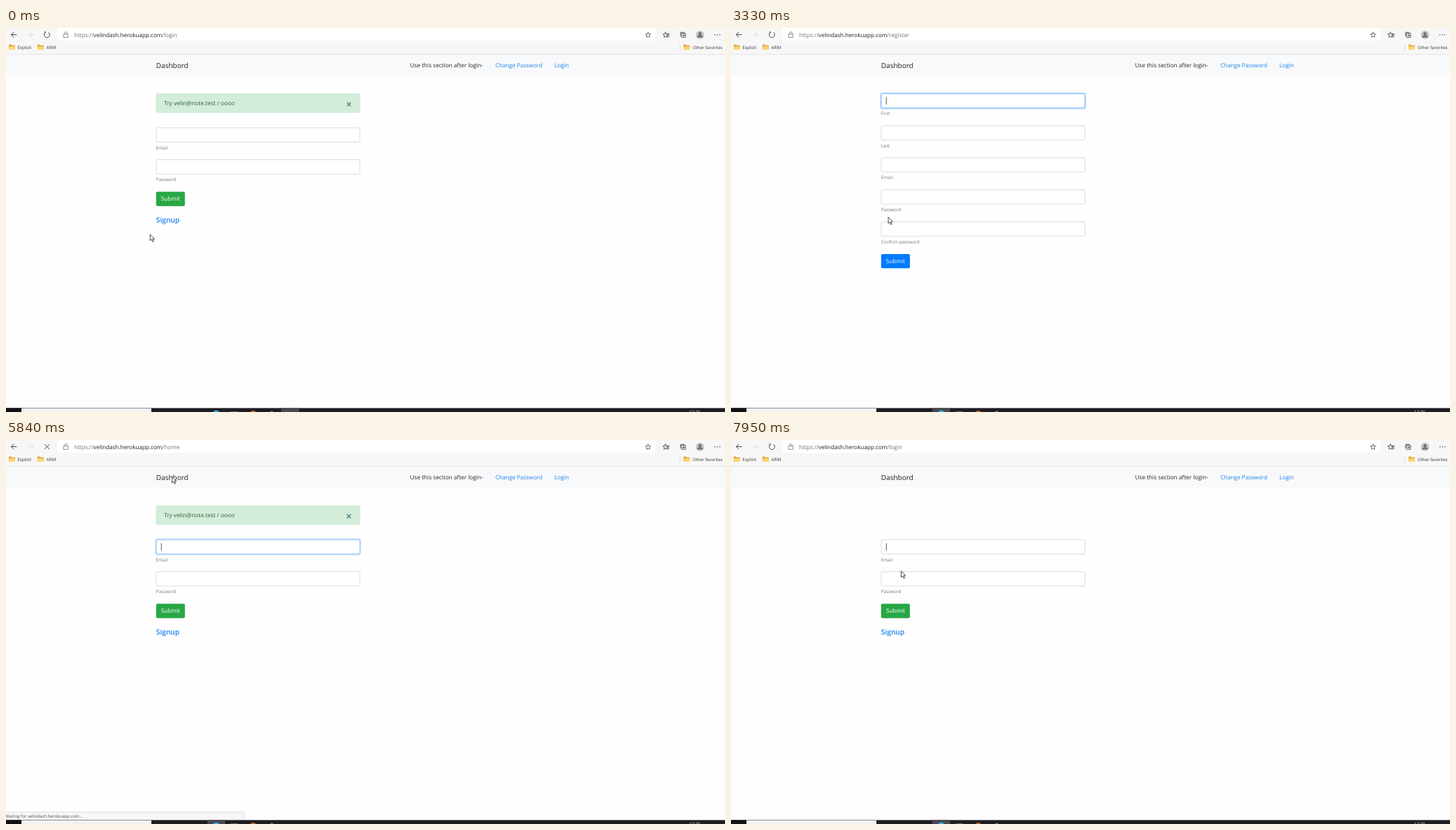
These frames come from a looping animation (1024 px wide and 547 px high, 8000 ms). An HTML page:

```html
<!DOCTYPE html>
<html lang="en">
<head>
<meta charset="utf-8">
<title>Dashbord</title>
<style>
  html, body { margin: 0; width: 100%; height: 100%; overflow: hidden; background: #fefefe; }
  svg { display: block; width: 100vw; height: 100vh; }
  text { font-family: "Open Sans", "Noto Sans", sans-serif; text-rendering: geometricPrecision; }
  .line { fill: none; stroke: #4a4a4a; stroke-width: 1; stroke-linecap: round; stroke-linejoin: round; }
  .cur { fill: #fff; stroke: #222; stroke-width: .8; stroke-linejoin: round; }
</style>
</head>
<body>
<svg id="stage" viewBox="0 0 1024 547" preserveAspectRatio="none"></svg>
<script>
const LOOP = 8000;
const HOST = 'velindash.herokuapp.com';
const stage = document.getElementById('stage');

// Markup helpers
const text = (x, y, size, fill, str, extra = '') =>
  `<text x="${x}" y="${y}" font-size="${size}" fill="${fill}" ${extra}>${str}</text>`;
const rect = (x, y, w, h, fill, extra = '') =>
  `<rect x="${x}" y="${y}" width="${w}" height="${h}" fill="${fill}" ${extra}/>`;
const line = (d, extra = '') => `<path class="line" d="${d}" ${extra}/>`;
const group = (id, body, extra = '') => `<g id="${id}" ${extra}>${body}</g>`;

const field = (y, label) =>
  rect(214, y, 290, 20.4, '#fff', 'rx="2" stroke="#ced4da" stroke-width=".8"') +
  text(213.8, y + 30.5, 6.4, '#6c757d', label);
const button = (y, fill) =>
  rect(213.8, y, 41, 20.4, fill, 'rx="2"') + text(220.8, y + 13.1, 8.2, '#fff', 'Submit');
const folder = x =>
  `<path d="M${x} 31V23.5h3.2l1.2 1.2h4.6V31z" fill="#e3a93c"/>` +
  `<path d="M${x} 31l.8-4.8h8.2V31z" fill="#fbd672"/>`;

const star = (x, y) => {
  let d = '';
  for (let i = 0; i < 10; i++) {
    const r = i % 2 ? 1.8 : 4, a = i * Math.PI / 5 - Math.PI / 2;
    d += (i ? 'L' : 'M') + (x + r * Math.cos(a)).toFixed(2) + ' ' + (y + r * Math.sin(a)).toFixed(2);
  }
  return d + 'z';
};

const toolbar =
  rect(0, 0, 1024, 37.5, '#f7f7f7') +
  rect(0, 37, 1024, 1, '#e6e6e6') +
  rect(73, -3, 852, 21.2, '#fff', 'id="omnibox" rx="2.5"') +
  line('M7.5 9.5H15M11 6L7.5 9.5 11 13') +
  line('M31 9.5h7.5M35 6l3.5 3.5L35 13', 'style="stroke:#dcdcdc"') +
  group('reload', line('M56.2 6.2A4 4 0 1 0 60.6 6.3M55.2 4.9l1.2 1.5-1.7 1')) +
  group('stop', line('M55.3 6.4l6.4 6.4M61.7 6.4l-6.4 6.4')) +
  line('M82.3 8.6h6v4.8h-6zM83.6 8.5V7.2a1.7 1.7 0 0 1 3.4 0v1.3', 'style="stroke:#777;stroke-width:.8"') +
  `<text x="97" y="13" font-size="8.1" fill="#737373">https://<tspan fill="#1d1d1d">${HOST}</tspan><tspan id="path"></tspan></text>` +
  line(star(914.5, 10), 'style="stroke-width:.8"') +
  line(star(939.3, 10) + 'M941.5 8.3h3M942 10.3h2.5M942.5 12.3h2', 'style="stroke-width:.9"') +
  line('M960.8 11V6.2h5.2M962.3 7.6h5.6v5.6h-5.6zM965.1 9v2.9M963.7 10.4h2.9', 'style="stroke-width:.9"') +
  '<circle cx="988.4" cy="9.7" r="6" fill="#c9c7c5"/>' +
  '<circle cx="988.4" cy="8" r="2.3" fill="#77716d"/><path d="M984.2 13.6a4.2 3.6 0 0 1 8.4 0z" fill="#77716d"/>' +
  [1009.7, 1013.2, 1016.7].map(x => `<circle cx="${x}" cy="9.7" r=".75" fill="#444"/>`).join('') +
  folder(4) + text(16.3, 29.7, 6.3, '#333', 'Exploit') +
  folder(44.8) + text(57.5, 29.7, 6.3, '#333', 'ARM') +
  rect(959.5, 23, .8, 9, '#d4d4d4') +
  folder(965) + text(978, 29.7, 6.05, '#333', 'Other favorites');

const navbar =
  rect(0, 38, 1024, 30, '#f8f9fa') +
  text(213.8, 56.9, 10, '#1f2022', 'Dashbord') +
  text(575.5, 56, 8.22, '#212529', 'Use this section after login-') +
  text(697, 56, 8.08, '#1a82f0', 'Change Password') +
  text(781, 56, 8.2, '#1a82f0', 'Login');

const alertBox =
  rect(214, 93.8, 290, 26.4, '#d4edda', 'rx="2" stroke="#c3e6cb" stroke-width=".8"') +
  text(225, 110.3, 8.25, '#2b6238', 'Try velin@note.test / oooo') +
  line('M485.9 106.2l4.8 4.8M490.7 106.2l-4.8 4.8', 'id="close" style="stroke-width:1.3"');

const login =
  field(142, 'Email') + field(187.6, 'Password') + button(233.3, '#28a745') +
  text(213.8, 277.2, 10.2, '#1a82f0', 'Signup', 'id="signup" font-weight="600"') +
  rect(214, 278.4, 34, .9, '#0056b3', 'id="under"');

const register =
  ['First', 'Last', 'Email', 'Password', 'Confirm password']
    .map((s, i) => field(93.6 + i * 45.65, s)).join('') + button(321.9, '#007bff');

const focus =
  group('ring',
    rect(213.2, -.8, 291.6, 22, 'none', 'rx="2.6" stroke="#bfdeff" stroke-width="2"') +
    rect(214, 0, 290, 20.4, 'none', 'rx="2" stroke="#80bdff" stroke-width=".9"')) +
  rect(220.8, 5, .9, 10.6, '#444', 'id="caret"');

const status =
  rect(-3, 530, 100, 14, '#f7f7f7', 'id="bubble" rx="2" stroke="#d6d6d6" stroke-width=".8"') +
  text(-1.7, 537.8, 6.1, '#4c4c4c', '', 'id="note"');

const taskbar =
  rect(0, 541.4, 1024, 6, '#1d1c20') +
  rect(0, 541.4, 22, 6, '#111114') +
  rect(22, 541.8, 185, 6, '#f2f2f2') +
  rect(0, 541.4, 25.6, 6, '#48484e', 'id="active"') +
  '<circle cx="299.4" cy="550" r="5.4" fill="#38a9e0"/>' +
  rect(320, 546, 10.5, 2, '#66666a') +
  '<circle cx="352" cy="550" r="5" fill="#b8652e"/>' +
  rect(376.5, 545.6, 4, 2, '#77777c') +
  text(973, 548.6, 6, '#f0f0f0', '12:20');

const cursors =
  group('arrow', '<path class="cur" d="M0 0V9l2.1-1.9 1.5 3.4 1.5-.7-1.5-3.2h2.7z"/>') +
  group('hand', '<path class="cur" d="M-1 .8a1 1 0 0 1 2 0V4.4l3.8.9q1.2.4 1.1 1.7L5.2 9.6 4.4 12H-.4L-3 7.8q-.4-1 .5-1.2L-1 7.6z"/>' +
    '<path class="line" d="M1 4.4v2M2.7 4.9v1.7M4.3 5.3v1.5" style="stroke-width:.5"/>') +
  group('beam', line('M-1.8-4.8h1.3l.5.5.5-.5h1.3M0-4.3V4.3M-1.8 4.8h1.3l.5-.5.5.5h1.3', 'style="stroke-width:.9;stroke:#333"'));

stage.innerHTML =
  rect(0, 0, 1024, 547, '#fefefe') + toolbar +
  group('navbar', navbar) + group('alert', alertBox) + group('login', login) +
  group('register', register) + group('focus', focus) +
  group('status', status) + taskbar + cursors;

const el = {};
stage.querySelectorAll('[id]').forEach(n => el[n.id] = n);
const set = (id, name, value) => el[id].setAttribute(name, value);
const show = (id, on) => set(id, 'visibility', on ? 'visible' : 'hidden');
const ramp = (t, a, b) => Math.min(1, Math.max(0, (t - a) / (b - a)));
const within = (t, a, b) => t >= a && t < b;

// Pointer track: time, x, y
const track = [
  [0, 205.2, 294], [70, 209, 291], [290, 245, 258], [390, 245, 258], [770, 233.5, 278],
  [2490, 233.5, 278], [2870, 590, 296], [2950, 590, 296], [3330, 224, 269.2],
  [3640, 228, 329], [4130, 240, 9], [4230, 240, 9], [4800, 236.4, 52],
  [6390, 236.4, 52], [7250, 242.4, 186.6], [LOOP, 242.4, 186.6]
];

function pointer(t) {
  const i = track.findIndex(k => k[0] > t);
  const [a, b] = [track[i - 1], track[i]], u = ramp(t, a[0], b[0]);
  return [a[1] + (b[1] - a[1]) * u, a[2] + (b[2] - a[2]) * u];
}

function render(t) {
  const onRegister = within(t, 2180, 5730);
  const blank = within(t, 7170, 7950);
  const onLogin = !onRegister && !blank;
  const loading = within(t, 5810, 7170);

  show('navbar', !within(t, 7170, 7320));
  show('login', onLogin);
  show('register', onRegister);
  show('alert', onLogin && t < 7170);
  el.close.style.stroke = t < 5730 ? '#68766c' : '#3f7f86';
  show('reload', !loading);
  show('stop', loading);
  el.path.textContent = t < 1780 || t >= 7170 ? '/login' : t < 5420 ? '/register' : '/home';
  set('active', 'x', t < 1860 ? 392 : 286.6);

  // Focus ring and caret
  const since = t < 5730 ? 2180 : t < 7950 ? 5730 : 7950;
  const focused = within(t, 2180, 5340) || within(t, 5730, 7170) || t >= 7950;
  const ring = t < 5730 ? ramp(t, 2180, 2330) * (1 - ramp(t, 5270, 5490))
    : t < 7170 ? ramp(t, 5690, 5880) : 0;
  set('focus', 'transform', `translate(0 ${onRegister ? 93.6 : 142})`);
  set('ring', 'opacity', ring);
  show('caret', focused && (t - since) % 1060 < 530);

  // Status bubble
  const first = t < 4000;
  const wide = first ? t >= 1940 : t >= 5420;
  set('bubble', 'width', (wide ? 339 : first ? 120 : 115) + 3);
  el.note.textContent = loading || t >= 7170 ? `Waiting for ${HOST}...`
    : `https://${HOST}/${first ? 'register' : 'home'}`;
  set('status', 'opacity', first
    ? ramp(t, 850, 1070) * (1 - ramp(t, 2490, 2640))
    : ramp(t, 4880, 5030) * (1 - ramp(t, 7100, 7250)));

  // Pointer shape follows what lies beneath it
  const [x, y] = pointer(t);
  const overBox = y < 18;
  const overSignup = onLogin && within(x, 214, 248) && within(y, 265, 281);
  const overBrand = within(x, 213, 261) && within(y, 43, 64) && t < 5730;
  const tops = onRegister ? [0, 1, 2, 3, 4].map(i => 93.6 + i * 45.65) : onLogin ? [142, 187.6] : [];
  const overField = within(x, 214, 504) && tops.some(top => within(y, top, top + 20.4));
  const overButton = within(x, 214, 255) && within(y, onRegister ? 322 : 233, onRegister ? 342 : 254) && !blank;
  const kind = overSignup || overBrand || overButton ? 'hand' : overBox || overField ? 'beam' : 'arrow';
  for (const id of ['arrow', 'hand', 'beam']) {
    show(id, id === kind);
    set(id, 'transform', `translate(${x.toFixed(2)} ${y.toFixed(2)})`);
  }
  set('omnibox', 'fill', overBox ? '#f1f1f1' : '#fff');
  set('signup', 'fill', overSignup ? '#0056b3' : '#1a82f0');
  show('under', overSignup);
}

const start = performance.now();
function tick() {
  render((performance.now() - start) % LOOP);
  requestAnimationFrame(tick);
}
tick();
</script>
</body>
</html>
```
